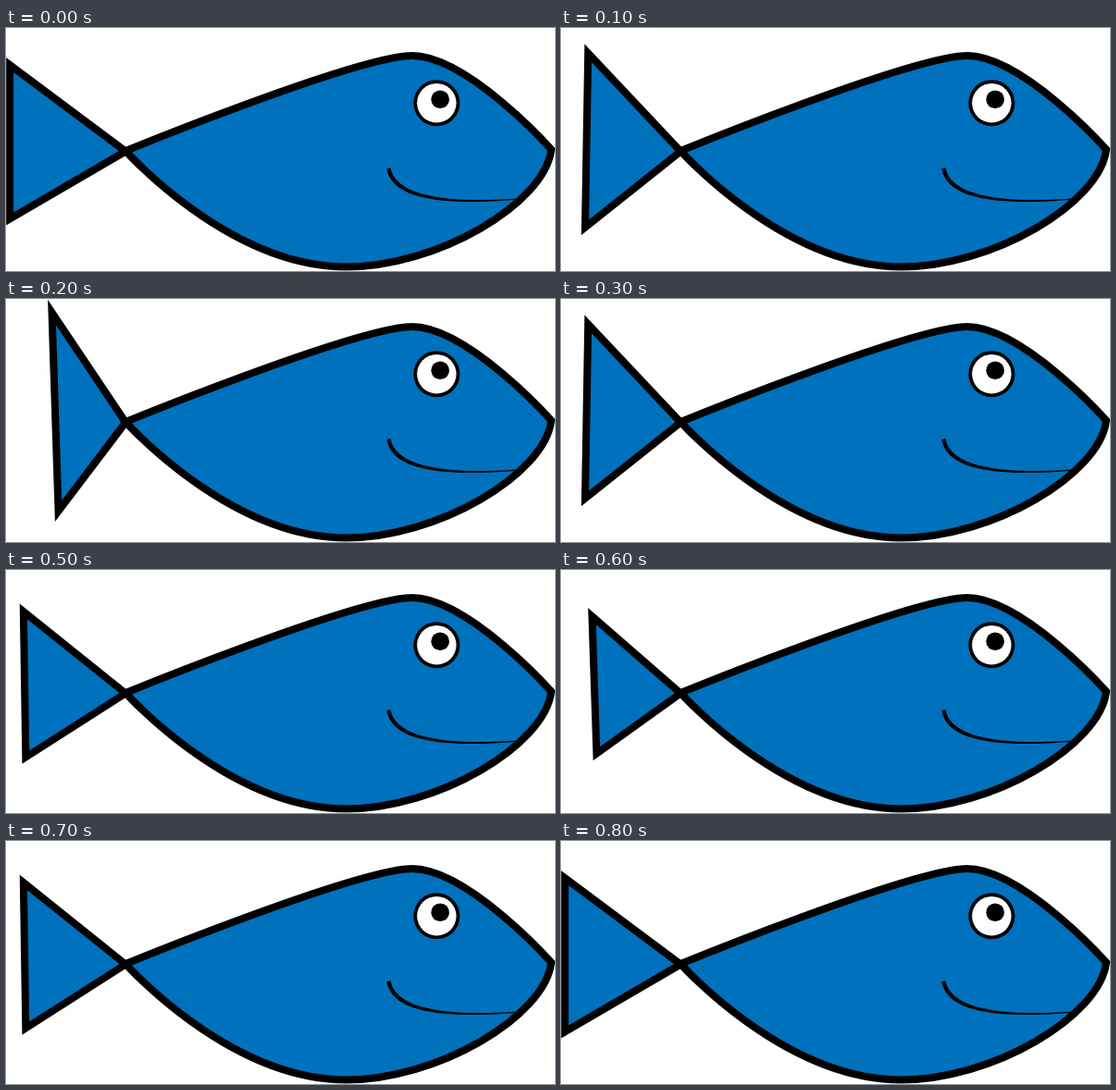
These frames come from a looping animation (592x263 px, 0.9 s). An HTML page with a canvas:

```html
<!DOCTYPE html>
<html lang="en">
<head>
<meta charset="utf-8">
<title>Swimming fish</title>
<style>
  html, body { margin: 0; width: 100%; height: 100%; overflow: hidden; background: #fff; }
  canvas { display: block; }
</style>
</head>
<body>
<canvas id="stage" width="592" height="263"></canvas>
<script>
const ctx = document.getElementById('stage').getContext('2d');
const BLUE = '#0071bc';
const STEP = 100;

// Tail tips: [top x, top y, bottom x, bottom y]
const REST = [4.2, 40, 4.2, 206.5];
const WIDE = [49.5, 14.5, 56.5, 229.5];
const HALF_WIDE = [29.2, 27.2, 26, 215.8];
const NARROW = [33.5, 50, 38.4, 198.7];
const HALF_NARROW = REST.map((v, i) => (v + NARROW[i]) / 2);
const POSES = [
  REST, HALF_WIDE, WIDE, HALF_WIDE,
  REST, HALF_NARROW, NARROW, HALF_NARROW, REST
];

const body = new Path2D(
  'M129 133 C129 133 380 30 438 30 C498 30 588 131.5 588 131.5 ' +
  'C581 190 465 258.5 367 258.5 C240 258.5 129 133 129 133 Z');
const mouth = new Path2D(
  'M414.5 151 C420 182 475 190 552 184.5 L552 185.7 ' +
  'C475 192 417 187 410.5 152.5 Z');

function outlined(path) {
  ctx.lineWidth = 8;
  ctx.fillStyle = BLUE;
  ctx.fill(path);
  ctx.stroke(path);
}

function disc(x, y, r, color) {
  ctx.beginPath();
  ctx.arc(x, y, r, 0, Math.PI * 2);
  ctx.fillStyle = color;
  ctx.fill();
}

function draw(time) {
  const [tx, ty, bx, by] = POSES[Math.floor(time / STEP) % POSES.length];
  ctx.fillStyle = '#fff';
  ctx.fillRect(0, 0, 592, 263);
  ctx.strokeStyle = '#000';
  ctx.lineJoin = 'miter';

  outlined(new Path2D(`M129 133.5 L${tx} ${ty} L${bx} ${by} Z`));
  outlined(body);

  ctx.fillStyle = '#000';
  ctx.fill(mouth);
  disc(464.4, 81.2, 25, '#000');
  disc(464.4, 81.2, 21.2, '#fff');
  disc(468.2, 77.3, 9.8, '#000');
}

const start = performance.now();
function tick() {
  draw(performance.now() - start);
  requestAnimationFrame(tick);
}
tick();
</script>
</body>
</html>
```
